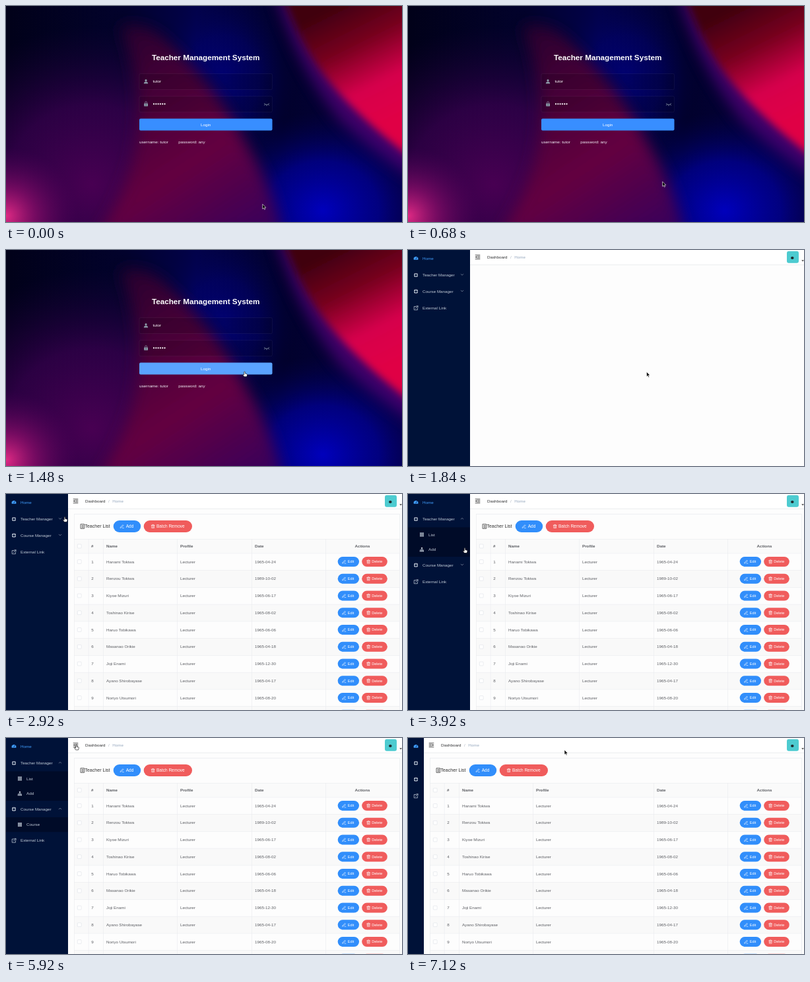
Write an HTML page that moves like this. It is 600x327 px and loops after 7.16 s.

```html
<!DOCTYPE html>
<html lang="en">
<head>
<meta charset="utf-8">
<title>Teacher Management System</title>
<style>
html, body { margin: 0; width: 100%; height: 100%; overflow: hidden; background: #020220; }
#stage { display: block; width: 100vw; height: 100vh; }
text { font-family: "Liberation Sans", Arial, sans-serif; font-size: 6.25px; white-space: pre; }
.b { font-weight: 700; }
.mid { text-anchor: middle; }
.line { fill: none; stroke-width: .75; stroke-linecap: round; stroke-linejoin: round; }
</style>
</head>
<body>
<svg id="stage" viewBox="0 0 600 327" xmlns="http://www.w3.org/2000/svg">
  <defs>
    <linearGradient id="base" x1="0" y1="0" x2="1" y2="0">
      <stop offset="0" stop-color="#010119"/><stop offset=".3" stop-color="#02022c"/>
      <stop offset=".48" stop-color="#02024a"/><stop offset=".7" stop-color="#01012c"/>
      <stop offset="1" stop-color="#060040"/>
    </linearGradient>
    <linearGradient id="band" gradientUnits="userSpaceOnUse" x1="180" y1="20" x2="380" y2="327">
      <stop offset="0" stop-color="#25002c"/><stop offset=".35" stop-color="#480038"/>
      <stop offset=".65" stop-color="#640040"/><stop offset="1" stop-color="#3e0058"/>
    </linearGradient>
    <linearGradient id="corner" gradientUnits="userSpaceOnUse" x1="500" y1="0" x2="585" y2="170">
      <stop offset="0" stop-color="#40000f"/><stop offset=".35" stop-color="#78001f"/>
      <stop offset=".7" stop-color="#d6004c"/><stop offset="1" stop-color="#e00045"/>
    </linearGradient>
    <radialGradient id="violet"><stop offset="0" stop-color="#480052"/><stop offset=".5" stop-color="#36004c" stop-opacity=".8"/><stop offset="1" stop-color="#1a0038" stop-opacity="0"/></radialGradient>
    <radialGradient id="pink"><stop offset="0" stop-color="#e02a84"/><stop offset=".4" stop-color="#9a1070" stop-opacity=".65"/><stop offset="1" stop-color="#50005a" stop-opacity="0"/></radialGradient>
    <radialGradient id="blue"><stop offset="0" stop-color="#0000bc"/><stop offset=".5" stop-color="#000096" stop-opacity=".75"/><stop offset="1" stop-color="#000050" stop-opacity="0"/></radialGradient>
    <filter id="soft" x="-20%" y="-20%" width="140%" height="140%"><feGaussianBlur stdDeviation="11"/></filter>
    <filter id="edge" x="-20%" y="-20%" width="140%" height="140%"><feGaussianBlur stdDeviation="6"/></filter>
    <clipPath id="sideClip"><rect id="sideClipBox" width="94" height="327"/></clipPath>
  </defs>
  <g id="login"></g>
  <g id="dash">
    <rect width="600" height="327" fill="#fdfdfd"/>
    <g id="content"></g>
    <g id="header"></g>
    <g id="side"></g>
  </g>
  <g id="cursor"></g>
</svg>
<script>
const LOOP = 7160, ENTER = 1840, SIDE = 94, SHRINK = 70;
const $ = id => document.getElementById(id);

const text = (x, y, s, fill, cls = '', size = 6.25) =>
  `<text x="${x}" y="${y + size * .35}" fill="${fill}" class="${cls}" style="font-size:${size}px">${s}</text>`;
const rect = (x, y, w, h, fill, r = 0, more = '') =>
  `<rect x="${x}" y="${y}" width="${w}" height="${h}" rx="${r}" fill="${fill}" ${more}/>`;
const line = (d, color, more = '') => `<path class="line" d="${d}" stroke="${color}" ${more}/>`;
const at = (x, y, body) => `<g transform="translate(${x} ${y})">${body}</g>`;

const pencil = (x, y) => at(x, y, line('M-2 1L1.3-2.3L2.3-1.3L-1 2L-2.3 2.3ZM.8 2.5H2.7', '#fff', 'style="stroke-width:.6"'));
const bin = (x, y) => at(x, y, line('M-2.5-1.6H2.5M-1-1.6V-2.6H1V-1.6M-1.9-1.6V2.5H1.9V-1.6M-.6-.2V1.3M.6-.2V1.3', '#fff', 'style="stroke-width:.6"'));

function pill(x, y, w, h, fill, icon, label, iconX, labelX, size) {
  return rect(x, y - h / 2, w, h, fill, h / 2) + icon(x + iconX, y) + text(x + labelX, y, label, '#fff', '', size);
}

// ---------- login page ----------
function loginPage() {
  const grey = '#8b9aa8', field = 'stroke="#fff" stroke-opacity=".09" stroke-width=".6"';
  const dots = Array.from({ length: 6 }, (_, i) => `<circle cx="${224 + i * 3.3}" cy="148.3" r="1.15" fill="#fff"/>`).join('');
  return rect(0, 0, 600, 327, 'url(#base)') +
    '<ellipse cx="480" cy="310" rx="170" ry="150" fill="url(#blue)"/>' +
    '<ellipse cx="330" cy="110" rx="110" ry="130" fill="url(#blue)" opacity=".4"/>' +
    '<ellipse cx="130" cy="270" rx="260" ry="240" fill="url(#violet)"/>' +
    '<path filter="url(#soft)" fill="url(#band)" d="M172 30Q215 22 245 55Q315 120 352 190Q405 270 418 345H140Q240 200 172 30Z"/>' +
    '<ellipse cx="0" cy="318" rx="110" ry="105" fill="url(#pink)"/>' +
    '<path filter="url(#soft)" fill="#55007a" opacity=".75" d="M408-20Q440 90 505 172Q550 215 620 262V-20Z"/>' +
    '<path filter="url(#edge)" fill="url(#corner)" d="M418-20Q450 75 512 140Q555 185 620 235V-20Z"/>' +
    text(302.7, 78, 'Teacher Management System', '#fff', 'b mid', 11.7) +
    rect(202, 102.5, 201.5, 24, 'rgba(0,0,0,.12)', 2, field) +
    rect(202, 136.7, 201.5, 24, 'rgba(0,0,0,.12)', 2, field) +
    `<circle cx="212" cy="112.7" r="1.6" fill="${grey}"/><path d="M208.8 117.5Q209 114.6 212 114.6T215.2 117.5Z" fill="${grey}"/>` +
    rect(209.2, 147.6, 5.8, 4.2, grey, .6) + line('M210.5 147.6V146.5A1.6 1.6 0 0 1 213.7 146.5V147.6', grey) +
    rect(211.7, 148.9, .8, 1.5, '#10102c') +
    text(222.5, 114.3, 'tutor', '#fff') + dots +
    line('M391.3 147.7Q395 151.5 398.7 147.7M392.3 149.3L391.6 150.3M395 149.8V151M397.7 149.3L398.4 150.3', grey) +
    rect(202, 170.4, 201.5, 18.2, '#388eff', 2, 'id="loginBtn"') +
    text(302.7, 179.8, 'Login', '#fff', 'mid') +
    text(202, 206, 'username: tutor', '#f2f2f6') + text(261.3, 206, 'password: any', '#f2f2f6');
}

// ---------- dashboard ----------
const people = [
  ['Hanami Tokiwa', '1965-04-24'], ['Renzou Tokiwa', '1989-10-02'], ['Kiyoe Mizuri', '1965-06-17'],
  ['Toshinao Kirise', '1965-08-02'], ['Haruo Tobikawa', '1965-06-06'], ['Masanao Orikie', '1965-04-18'],
  ['Joji Enami', '1965-12-30'], ['Ayano Shirobayase', '1965-04-17'], ['Noriyo Utsumori', '1965-08-20']
];

function contentPage() {
  const ink = '#5c5e63', rule = '#e9ebef', top = 68, head = 21.6, step = 25.75;
  const check = y => rect(108.3, y - 2.9, 5.8, 5.8, '#fff', .8, 'stroke="#dcdfe6" stroke-width=".6"');
  const sep = x => rect(x, top, .6, 327 - top, rule);
  let fixed = rect(33, 30.5, 563.5, 300, '#fdfdfd', 0, `stroke="${rule}" stroke-width=".7"`) +
    rect(33, top, 563.5, head, '#fafafa') + rect(33, top, 563.5, .6, rule);
  let moving = rect(20, 24, 83, 303, '#fdfdfd') + rect(103, 30.5, .6, 300, rule) +
    line('M113.4 45.7H118.6V52.3H113.4ZM115 47.6H117M115 49.2H117M115 50.8H117', '#333') +
    text(119.3, 49, 'Teacher List', '#333', '', 7.1) +
    pill(162.7, 49, 41.5, 18, '#318efb', pencil, 'Add', 13, 19, 6.5) +
    pill(208.7, 49, 73.3, 18, '#f05c5c', bin, 'Batch Remove', 14, 19.3, 6.5) +
    check(79) + text(129, 79, '#', ink, 'b') + text(152, 79, 'Name', ink, 'b') + text(264, 79, 'Profile', ink, 'b');
  let cells = text(377, 79, 'Date', ink, 'b') + text(540, 79, 'Actions', ink, 'b mid');

  for (let i = 0; i < 10; i++) {
    const y0 = top + head + i * step, y = y0 + 12.9;
    if (i % 2) fixed += rect(33, y0, 563.5, step, '#f9f9f9');
    fixed += rect(33, y0, 563.5, .6, rule);
    cells += pill(502.7, y, 32.3, 15, '#318efb', pencil, 'Edit', 9.5, 15, 5.6) +
      pill(539.2, y, 38.6, 15, '#f05c5c', bin, 'Delete', 10, 15, 5.6);
    if (!people[i]) continue;
    const [name, date] = people[i];
    moving += check(y) + text(129.3, y, i + 1, ink) + text(152, y, name, ink) + text(264, y, 'Lecturer', ink);
    cells += text(377, y, date, ink);
  }
  return fixed + `<g class="shift">${moving}${[124.8, 147, 259].map(sep).join('')}</g>` +
    sep(372) + sep(484.3) + sep(596.3) + cells;
}

function headerBar() {
  return rect(0, 0, 600, 22, '#fff') + rect(0, 22, 600, .7, '#e6e8eb') +
    '<g class="shift">' +
    `<g id="burger">${line('M-3.4-3H3.4M-.6-1H3.4M-.6 1H3.4M-3.4 3H3.4', '#222')}<path d="M-3.6 0L-1.6-1.6V1.6Z" fill="#222"/></g>` +
    text(120, 11, 'Dashboard', '#303133') + text(155, 11, '/', '#a8b0bd') + text(161.3, 11, 'Home', '#97a8be') + '</g>' +
    rect(574, 1.8, 18, 18, '#4dcbd0', 3) + '<ellipse cx="582.3" cy="12" rx="2.3" ry="2" fill="#202a2e"/>' +
    '<path d="M596.2 15.2H600L598.1 17.4Z" fill="#444"/>';
}

function sideBar() {
  const ink = '#c3ccd8', sub = '#000b28';
  const ring = at(12, 0, `<circle r="2.3" fill="none" stroke="${ink}" stroke-width="1.6"/>` +
    line('M0-3.2V-1.6M0 1.6V3.2M-3.2 0H-1.6M1.6 0H3.2', '#001238'));
  const gauge = '<path d="M8.8 14.8A3.5 3.5 0 1 1 15.2 14.8Z" fill="#409eff"/>' + line('M12 13.7L13.2 11.4', '#001238');
  const chevron = id => `<g class="label"><path id="${id}" class="line" d="M-1.8-.8L0 .9L1.8-.8" stroke="#7d8ba0" transform="translate(82 -.7)"/></g>`;
  const label = (y, s, fill = ink) => `<g class="label">${text(22, y, s, fill)}</g>`;
  let grid = '';
  for (let i = 0; i < 9; i++) grid += rect(18 + i % 3 * 2.1, 8.2 + (i / 3 | 0) * 2.1, 1.7, 1.7, ink);
  const tree = rect(19.9, 30.6, 2.2, 1.9, ink) + [17.8, 20, 22.2].map(x => rect(x, 35.2, 1.8, 1.8, ink)).join('') +
    line('M21 32.5V35M18.7 35V34H23.1V35', ink);
  const link = line('M12.3-2.2H9.2V3H14.4V.3M11.6.7L15-2.9M12.9-2.9H15V-.8', ink);
  return rect(0, 0, SIDE, 327, '#001238', 0, 'id="sideBg"') + '<g clip-path="url(#sideClip)">' +
    gauge + label(12.7, 'Home', '#409eff') +
    at(0, 38, ring + label(0, 'Teacher Manager') + chevron('chevA')) +
    `<svg id="subA" y="50.3" width="94" height="45" overflow="hidden">${rect(0, 0, 94, 45, sub)}${grid}${text(31, 11.2, 'List', ink)}${tree}${text(31, 33.7, 'Add', ink)}</svg>` +
    `<g id="course">${ring}${label(0, 'Course Manager')}${chevron('chevB')}</g>` +
    `<svg id="subB" width="94" height="22.5" overflow="hidden">${rect(0, 0, 94, 22.5, sub)}${grid}${text(31, 11.2, 'Course', ink)}</svg>` +
    `<g id="external">${link}${label(0, 'External Link')}</g></g>`;
}

function pointers() {
  return '<path id="arrow" d="M0 0V7.2L1.7 5.7L2.8 8.2L4 7.7L2.9 5.2H5.2Z" fill="#000" stroke="#fff" stroke-width=".6"/>' +
    '<path id="hand" d="M-.8 0Q0-.9 .8 0V2.5L3.6 3.2Q4.2 3.5 4 4.6L3.3 7.3H-.7L-2.7 4.5Q-2.6 3.5-1.6 4L-.8 4.6Z" fill="#fff" stroke="#000" stroke-width=".6"/>';
}

$('login').innerHTML = loginPage();
$('content').innerHTML = contentPage();
$('header').innerHTML = headerBar();
$('side').innerHTML = sideBar();
$('cursor').innerHTML = pointers();

// ---------- motion ----------
const track = [
  [0, 388.7, 300], [280, 388.7, 300], [680, 385.6, 266], [1060, 374, 214], [1400, 361.5, 184.5],
  [2120, 361.5, 184.5], [2800, 89, 35], [3240, 89, 35], [3920, 86, 82], [4260, 82, 105],
  [4880, 82, 105], [5760, 106.3, 10.7], [6320, 106.3, 10.7], [7000, 237, 18], [LOOP, 237, 18]
];
const smooth = p => p * p * (3 - 2 * p);
const ramp = (t, from, to) => smooth(Math.min(1, Math.max(0, (t - from) / (to - from))));

function cursorAt(t) {
  const i = track.findIndex(k => k[0] > t), [t0, x0, y0] = track[i - 1], [t1, x1, y1] = track[i];
  // consecutive moves stay at a steady pace
  const p = (t - t0) / (t1 - t0), e = (t0 >= 2120 && t0 !== 3240 && t0 !== 3920) ? smooth(p) : p;
  return [x0 + (x1 - x0) * e, y0 + (y1 - y0) * e];
}

const move = (el, x, y, more = '') => el.setAttribute('transform', `translate(${x} ${y}) ${more}`);
const shifts = document.querySelectorAll('.shift'), labels = document.querySelectorAll('.label');

function draw(t) {
  const onLogin = t < ENTER;
  $('login').style.display = onLogin ? '' : 'none';
  $('dash').style.display = onLogin ? 'none' : '';
  $('content').style.opacity = ramp(t, ENTER, ENTER + 240);

  const fold = ramp(t, 6260, 6560), width = SIDE - SHRINK * fold;
  const close = 1 - ramp(t, 6260, 6400);
  const a = ramp(t, 3260, 3560) * close, b = ramp(t, 4500, 4800) * close;
  shifts.forEach(g => move(g, -SHRINK * fold, 0));
  labels.forEach(g => g.style.opacity = close);
  $('sideBg').setAttribute('width', width);
  $('sideClipBox').setAttribute('width', width);
  const courseY = 62.7 + 45 * a;
  $('subA').setAttribute('height', 45 * a);
  move($('course'), 0, courseY);
  $('subB').setAttribute('y', courseY + 12.3);
  $('subB').setAttribute('height', 22.5 * b);
  move($('external'), 0, courseY + 25 + 22.5 * b);
  move($('chevA'), 82, -.7, `rotate(${180 * a})`);
  move($('chevB'), 82, -.7, `rotate(${180 * b})`);
  move($('burger'), 105.5, 10.7, `scale(${fold > .5 ? -1 : 1} 1)`);

  const [x, y] = cursorAt(t);
  const overLogin = onLogin && x > 202 && x < 403 && y > 170 && y < 189;
  const burgerX = 105.5 - SHRINK * fold;
  const overDash = !onLogin && (x < width || (Math.abs(x - burgerX) < 6 && y < 22));
  const hand = overLogin || overDash;
  $('loginBtn').setAttribute('fill', overLogin ? '#5aa3ff' : '#388eff');
  $('hand').style.display = hand ? '' : 'none';
  $('arrow').style.display = hand ? 'none' : '';
  move($('cursor'), x, y);
}

const start = performance.now();
function tick() {
  draw((performance.now() - start) % LOOP);
  requestAnimationFrame(tick);
}
tick();
</script>
</body>
</html>
```
